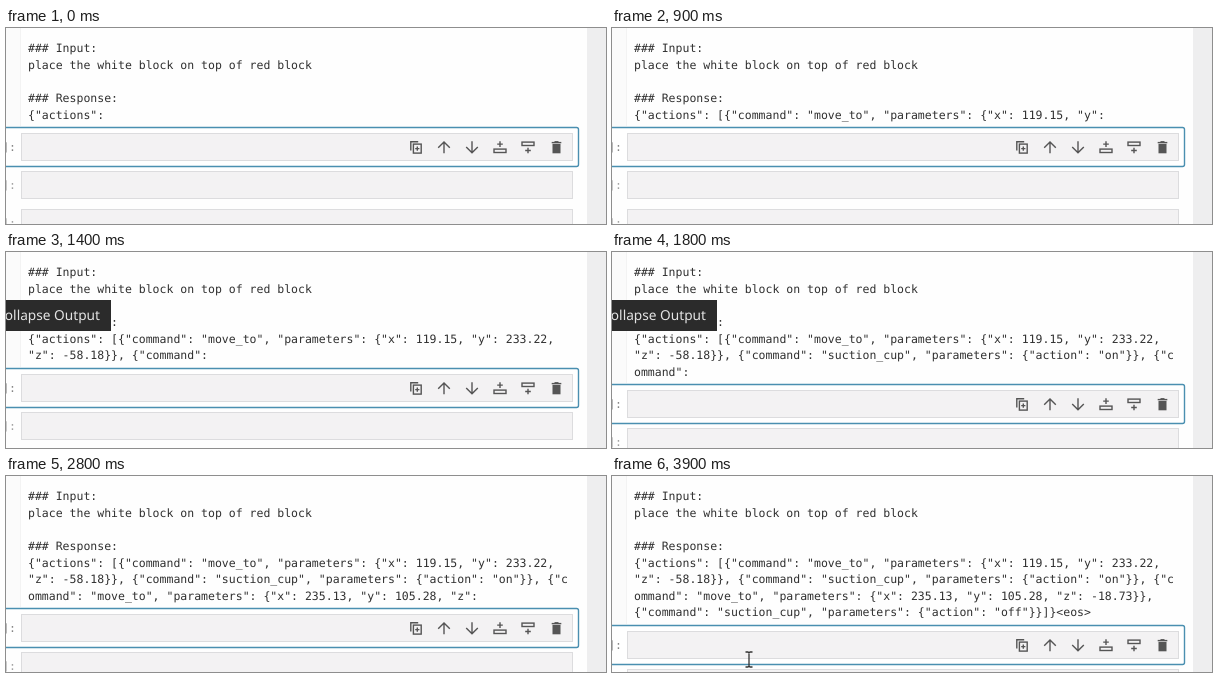
An HTML page with a canvas for the animation above (4000 ms loop, 600x196 px).

```html
<!DOCTYPE html>
<html lang="en">
<head>
<meta charset="utf-8">
<title>Streaming response</title>
<style>
  html, body { margin: 0; width: 100%; height: 100%; overflow: hidden; background: #fff; }
  canvas { display: block; }
</style>
</head>
<body>
<canvas id="stage" width="600" height="196"></canvas>
<script>
const ctx = document.getElementById('stage').getContext('2d');
const LOOP = 4000, STEP = 100;
const LINE = 16.55, LEFT = 22, BASE = 24.3;
const MONO = '11.5px "DejaVu Sans Mono", monospace';
const SANS = '13.7px "Noto Sans", "Open Sans", sans-serif';

const prompt = ['### Input:', 'place the white block on top of red block', '', '### Response:'];

// Words appear as they are streamed: [time in ms, text].
const stream = [
  [0, '{"actions":'], [100, ' [{"command":'], [300, ' "move_to",'],
  [300, ' "parameters":'], [400, ' {"x":'], [600, ' 119.15,'],
  [700, ' "y":'], [1000, ' 233.22,'], [1000, '\n"z":'],
  [1300, ' -58.18}},'], [1300, ' {"command":'], [1500, ' "suction_cup",'],
  [1600, ' "parameters":'], [1600, ' {"action":'], [1700, ' "on"}},'],
  [1800, ' {"c\nommand":'], [1900, ' "move_to",'], [2000, ' "parameters":'],
  [2100, ' {"x":'], [2400, ' 235.13,'], [2400, ' "y":'],
  [2600, ' 105.28,'], [2700, ' "z":'], [3000, ' -18.73}},'],
  [3000, '\n{"command":'], [3200, ' "suction_cup",'], [3300, ' "parameters":'],
  [3300, ' {"action":'], [3500, ' "off"}}]}'], [3500, '<eos>']
];

function box(x, y, w, h, fill, stroke) {
  ctx.fillStyle = fill;
  ctx.fillRect(x, y, w, h);
  if (!stroke) return;
  ctx.strokeStyle = stroke;
  ctx.lineWidth = 1;
  ctx.strokeRect(x + 0.5, y + 0.5, w - 1, h - 1);
}

function label(text, x, y, font, color, align = 'left') {
  ctx.font = font;
  ctx.textRendering = 'geometricPrecision';
  ctx.textAlign = align;
  ctx.fillStyle = color;
  ctx.fillText(text, x, y);
}

function lines(...paths) {
  ctx.beginPath();
  for (const [x, y, ...rest] of paths) {
    ctx.moveTo(x, y);
    for (let i = 0; i < rest.length; i += 2) ctx.lineTo(rest[i], rest[i + 1]);
  }
  ctx.stroke();
}

function at(x, y, flip, draw) {
  ctx.save();
  ctx.translate(x, y);
  ctx.scale(1, flip);
  draw();
  ctx.restore();
}

function arrow() {
  lines([0, 6, 0, -5.3], [-5.8, 0.4, 0, -5.4, 5.8, 0.4]);
}

function insert() {
  ctx.strokeRect(-6, 1.8, 12, 3.4);
  lines([0, -6, 0, -0.4], [-2.8, -3.2, 2.8, -3.2]);
}

function duplicate() {
  lines([-5.2, 3.2, -5.2, -5.6, 2.2, -5.6]);
  ctx.strokeRect(-2.6, -3.2, 7.8, 9);
  lines([1.3, -0.8, 1.3, 3.4], [-0.8, 1.3, 3.4, 1.3]);
}

function trash() {
  ctx.fillRect(-4, -3.4, 8, 9.4);
  ctx.fillRect(-4.8, -5.4, 9.6, 1.4);
  ctx.fillRect(-2, -6.2, 4, 1.2);
}

function toolbar(y) {
  ctx.strokeStyle = ctx.fillStyle = '#555';
  ctx.lineWidth = 1.4;
  at(410, y, 1, duplicate);
  at(438, y, 1, arrow);
  at(466, y, -1, arrow);
  at(494, y, 1, insert);
  at(522, y, -1, insert);
  at(550.5, y, 1, trash);
}

function cell(y, active) {
  if (active) {
    ctx.beginPath();
    ctx.roundRect(-10, y - 5.5, 582.5, 39, 2);
    ctx.fillStyle = '#fff';
    ctx.fill();
    ctx.strokeStyle = '#4a8fb0';
    ctx.lineWidth = 1.4;
    ctx.stroke();
  }
  box(15, y, 552, 28, '#f3f2f3', '#dcdcde');
  label(']:', 10, y + 17.5, MONO, active ? '#858585' : '#a2a2a2', 'right');
  if (active) toolbar(y + 14.3);
}

function tooltip() {
  box(0, 48, 105, 31, '#2b2b2b');
  label('ollapse Output', 94, 68.3, SANS, '#e4e4e4', 'right');
}

function textCursor(t) {
  const p = Math.min(1, (t - 3600) / 300), ease = p * (2 - p);
  const x = 20 + 117 * ease, y = 95 + 88.5 * ease;
  ctx.strokeStyle = '#333';
  ctx.lineWidth = 1.3;
  lines([x, y - 7, x, y + 7],
        [x - 3.5, y - 7.5, x - 1, y - 7.5, x, y - 6.5, x + 1, y - 7.5, x + 3.5, y - 7.5],
        [x - 3.5, y + 7.5, x - 1, y + 7.5, x, y + 6.5, x + 1, y + 7.5, x + 3.5, y + 7.5]);
}

function draw(t) {
  box(0, 0, 600, 196, '#fefefe');
  box(581, 0, 19, 196, '#eeeeef');

  const answer = stream.filter(([time]) => time <= t).map(([, word]) => word).join('').split('\n');
  const shift = Math.round((answer.length - 1) * LINE);
  box(0, 0, 15, 98 + shift, '#fbfbfb');
  box(14, 0, 1, 98 + shift, '#f3f3f3');

  [...prompt, ...answer].forEach((text, i) => label(text, LEFT, BASE + i * LINE, MONO, '#303030'));
  for (let i = 0; i < 3; i++) cell(105 + shift + i * 38, i === 0);

  if (t >= 1300 && t < 1900) tooltip();
  if (t >= 3700) textCursor(t);
}

function tick() {
  const t = performance.now() % LOOP;
  draw(Math.floor(t / STEP) * STEP);
  requestAnimationFrame(tick);
}
tick();
</script>
</body>
</html>
```
